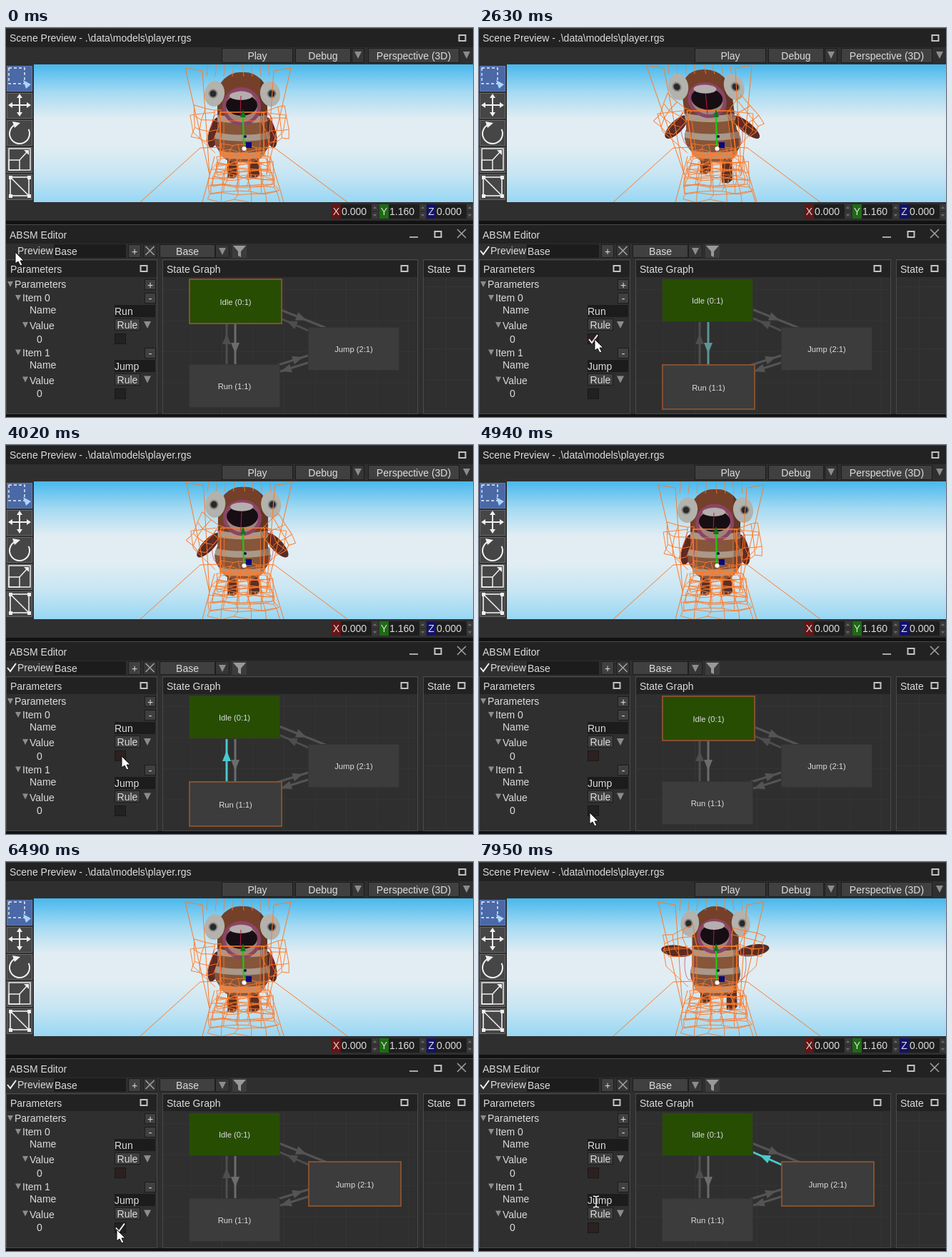
Recreate the animation shown at these times as an HTML page with a canvas. Size 654 px wide and 545 px high, loop 8 s.

```html
<!DOCTYPE html>
<html>
<head>
<meta charset="utf-8">
<style>
html, body { margin: 0; width: 100%; height: 100%; overflow: hidden; background: #141414; }
canvas { display: block; }
</style>
</head>
<body>
<canvas id="stage" width="654" height="545"></canvas>
<script>
const c = document.getElementById('stage').getContext('2d');
const LOOP = 8000, STEP = 77.3, TAU = Math.PI * 2;
const ORANGE = '#ff7a2a', PANEL = '#2f2f2f', HEAD = '#222', GRID = '#353535', GREY = '#8c8c8c', WHITE = '#f0f0f0';
const SIDES = [-1, 1];
const clamp = v => Math.max(0, Math.min(1, v));
const ramp = (t, a, b) => clamp((t - a) / (b - a));
const mix = (a, b, k) => a + (b - a) * k;
let seed;
const rnd = () => (seed = seed * 16807 % 2147483647) / 2147483647;

function box(x, y, w, h, fill, edge) {
  c.fillStyle = fill;
  c.fillRect(x, y, w, h);
  if (edge) frame(x + .5, y + .5, w - 1, h - 1, edge, 1);
}
function frame(x, y, w, h, color, width) {
  c.strokeStyle = color; c.lineWidth = width;
  c.strokeRect(x, y, w, h);
}
function trace(pts) {
  c.beginPath();
  for (let i = 0; i < pts.length; i += 2) c.lineTo(pts[i], pts[i + 1]);
}
function line(color, width, ...pts) {
  trace(pts);
  c.strokeStyle = color; c.lineWidth = width; c.stroke();
}
function poly(color, ...pts) {
  trace(pts);
  c.fillStyle = color; c.fill();
}
function oval(color, x, y, rx, ry = rx, turn = 0) {
  c.beginPath(); c.ellipse(x, y, rx, ry, turn, 0, TAU);
  c.fillStyle = color; c.fill();
}
function at(x, y, angle, flip, paint) {
  c.save();
  c.translate(x, y);
  c.scale(flip, 1);
  c.rotate(angle);
  paint();
  c.restore();
}
function clipTo(x, y, w, h, paint) {
  c.save();
  c.beginPath(); c.rect(x, y, w, h); c.clip();
  paint();
  c.restore();
}
function text(s, x, y, align = 'left', size = 14) {
  c.font = size + 'px "Liberation Sans", Arial, sans-serif';
  c.textAlign = align; c.fillStyle = '#dcdcdc';
  c.fillText(s, x, y + size * .36);
}
function button(s, x, y, w, h) {
  box(x, y, w, h, '#404040', '#1c1c1c');
  text(s, x + w / 2, y + h / 2, 'center');
}
const down = (x, y, r = 5) => poly(GREY, x - r, y - r, x + r, y - r, x, y + r);
const check = (x, y) => line(WHITE, 2, x - 6, y, x - 2, y + 5, x + 6, y - 6);
const square = (x, y) => frame(x - 4.5, y - 4, 9, 8, '#c4c4c4', 2);
function cross(x, y) {
  for (const d of SIDES) line('#a0a0a0', 1.6, x - 6, y - 6 * d, x + 6, y + 6 * d);
}
function gridLines(x, y, right, bottom) {
  for (let u = x; u < right; u += 43.5) line(GRID, 1, u, 350, u, bottom);
  for (let v = y; v < bottom; v += 43.5) line(GRID, 1, x - 40, v, right, v);
}

// Wobbly wire grid: a trapezoid with a top and a bottom edge.
function mesh(x, y, top, bottom, h, cols, rows, wobble) {
  const grid = [];
  for (let r = 0; r <= rows; r++) {
    grid.push([]);
    for (let i = 0; i <= cols; i++) {
      grid[r].push([x + (i / cols - .5) * mix(top, bottom, r / rows) + (rnd() - .5) * wobble,
                    y + h * r / rows + (rnd() - .5) * wobble]);
    }
  }
  grid.forEach((row, r) => {
    line(ORANGE, .9, ...row.flat());
    if (r) row.forEach((p, i) => line(ORANGE, .9, ...p, ...grid[r - 1][i]));
  });
}

function pose(t) {
  const run = ramp(t, 2150, 2450) - ramp(t, 3950, 4350);
  const jump = ramp(t, 5420, 5650);
  const phase = Math.max(0, t - 5450) / 1150 % 1;
  const lift = phase < .55 ? jump * Math.sin(Math.PI * phase / .55) : 0;
  const idle = t < 600 ? 0 : (1 - Math.cos((t - 600) / 2400 * TAU)) / 2;
  const beat = (t - 3160) / 600 * TAU + .66;
  return {
    run, lift, beat,
    sway: -13 * run * Math.sin(beat),
    look: mix(3 * idle * (1 - jump), 6.5, run) + 6 * lift + jump
  };
}

function face(narrow, look) {
  c.save();
  c.translate(331, -look);
  c.scale(narrow, 1);
  oval('#8b4466', -1, 110, 27, 27 - look * .4);
  oval('#a08478', -1, 110, 22, 22 - look * .4);
  oval('#170e14', -1, 108, 22, 15);
  oval('#b5aeae', -2, 95, 16, 6);
  for (const side of SIDES) {
    const x = side * 39;
    oval('#b3b2ac', x, 92, 14, 18, side * -.15);
    oval('#85847f', x + side * 2, 92, 6.5);
    oval('#29292c', x + side * 2, 92, 4.5);
  }
  c.restore();
}

function character(t) {
  const { run, lift, beat, sway, look } = pose(t);
  const spread = .25 + .6 * run + 1.72 * lift;
  const angles = [spread, spread + Math.max(0, lift - .82) * 3.5];
  const stride = 7 * run * Math.sin(beat);

  for (const side of SIDES) {
    at(332 + side * 15 + (side > 0 ? 8 * lift : 0), 178 + side * stride - (side < 0 ? 15 : 4) * lift, 0, 1, () => {
      poly('#5a3024', -7, 0, 7, 0, 8, 28, 2, 33, -7, 32);
      for (const x of [-4, 2]) line('#a08a76', 1.6, x, 28, x, 32);
    });
  }

  // The body leans about the feet.
  c.save();
  c.translate(331, 185);
  c.transform(1, 0, -sway / 95, 1 + run * .03, 0, 0);
  c.translate(-331, -185);
  SIDES.forEach((side, i) => at(331 + side * 34, 127, angles[i], -side, () => oval('#5a2b22', 0, 20, 8, 22)));

  const body = new Path2D();
  body.roundRect(296 + 3 * lift, 62, 70 - 6 * lift, 126, [32, 32, 26, 26]);
  body.ellipse(331, 156, 39 - 5 * lift, 30, 0, 0, TAU);
  c.save();
  c.clip(body);
  box(285, 55, 90, 140, '#74402a');
  box(285, 125, 90, 70, '#86553a');
  for (let i = 0; i < 3; i++) {
    c.beginPath(); c.ellipse(331, 119 + i * 25, 48, 10, 0, 0, Math.PI);
    c.strokeStyle = '#a8998a'; c.lineWidth = 9; c.stroke();
  }
  box(356, 60, 20, 130, 'rgba(50,20,10,.25)');
  c.restore();
  face(1 - .1 * lift, look);

  for (const side of SIDES) {
    const m = x => 325 + side * x;
    line(ORANGE, 1, m(50), 60, m(74), 56, m(40), 205);
    line(ORANGE, 1, m(50), 60, m(40), 205);
    for (let i = 0; i < 4; i++) line(ORANGE, .8, m(8 + i * 12), 68, m(6 + i * 12), 48);
    line(ORANGE, .9, m(32), 118, m(67), 122, m(63), 146, m(32), 175);
    at(329 + side * 32, 126, angles[i = (side + 1) / 2] * .8, -side, () => mesh(-15, -10, 36, 28, 44, 3, 3, 7));
    c.beginPath(); c.ellipse(331 + side * 36, 143, 7, 22, 0, 0, TAU);
    c.strokeStyle = 'rgba(184,25,61,.7)'; c.lineWidth = .8; c.stroke();
  }
  frame(300, 118, 61, 60, ORANGE, 1.6);
  frame(305, 130, 51, 48, ORANGE, .8);
  line('#b8193d', 1, 329, 95, 328, 122);
  c.restore();

  // Wires around the legs, widening towards the viewer.
  for (let i = 0; i < 4; i++) mesh(332 + stride * (i - 1.5) / 3, 165 + i * 8, 56 + i * 8, 78 + i * 8, 42 + i * 4, 5, 5, 7);
  for (const side of SIDES) {
    line(ORANGE, 1, 331 + side * 39, 180, 332 + side * 57, 244);
    line(ORANGE, 1, 333 + side * 145, 244, 324 + side * 52, 168, 331 + side * 30, 167);
  }

  // Move gizmo.
  line('#10d010', 2.2, 332, 124, 333, 165);
  poly('#0b7a1c', 328, 125, 332, 114, 336, 125);
  oval('#10105c', 335, 152, 2);
  box(336, 160, 8, 8, '#0a0a78');
  oval('#fff', 333.5, 169, 3);
}

function viewport(t) {
  const sky = c.createLinearGradient(0, 51, 0, 244);
  ['#48b8ed', '#a4daf2', '#e2edf3', '#e0edf3', '#c6e5f3', '#98d7f4'].forEach((color, i) => sky.addColorStop(i / 5, color));
  clipTo(39, 51, 615, 193, () => {
    box(39, 51, 615, 193, sky);
    character(t);
  });
}

function toolIcons() {
  for (let i = 0; i < 5; i++) box(1, 53 + i * 38, 36, 36, i ? '#464646' : '#4a69a6', i ? '#686868' : '#5d7cba');
  c.setLineDash([4, 3]);
  frame(4, 56, 22, 22, WHITE, 1.4);
  c.setLineDash([]);
  poly('#a9d4ff', 24, 73, 35, 79, 28, 85);
  at(19, 108, 0, 1, () => {
    for (let i = 0; i < 4; i++) {
      line(WHITE, 2, 0, 0, 0, -11);
      poly(WHITE, -4, -10, 0, -16, 4, -10);
      c.rotate(TAU / 4);
    }
  });
  c.beginPath(); c.arc(19, 148, 14, -.45, 4.3);
  c.strokeStyle = WHITE; c.lineWidth = 2; c.stroke();
  poly(WHITE, 9, 131, 20, 133, 12, 140);
  frame(4, 169, 30, 30, WHITE, 1.5);
  frame(4, 185, 15, 14, WHITE, 1.5);
  line(WHITE, 1.5, 19, 185, 30, 173);
  poly(WHITE, 25, 171, 32, 171, 32, 178);
  frame(6, 209, 26, 26, WHITE, 1.6);
  line(WHITE, 1.6, 6, 209, 32, 235);
  for (let i = 0; i < 4; i++) box(4 + i % 2 * 26, 207 + (i >> 1) * 26, 5, 5, WHITE);
}

function scenePanel(t) {
  box(0, 0, 654, 270, PANEL);
  box(0, 0, 654, 27, HEAD);
  box(0, 0, 654, 1, '#3c3c3c');
  text('Scene Preview - .\\data\\models\\player.rgs', 5, 14);
  square(639, 14);
  button('Play', 302, 28, 100, 21);
  button('Debug', 405, 28, 78, 21);
  box(484, 28, 18, 21, '#363636', '#1c1c1c');
  down(493, 38);
  button('Perspective (3D)', 507, 28, 128, 21);
  down(645, 38);
  viewport(t);
  toolIcons();
  [['X', '#681414', '0.000'], ['Y', '#1d6b14', '1.160'], ['Z', '#12126a', '0.000']].forEach(([axis, color, value], i) => {
    const x = 456 + Math.round(i * 66.5);
    box(x, 247, 13, 20, color);
    text(axis, x + 6.5, 257, 'center');
    box(x + 13, 247, 43, 20, '#1e1e1e');
    text(value, x + 14, 257);
    for (const d of SIDES) {
      box(x + 56, d < 0 ? 247 : 258, 9, 9, '#383838');
      poly('#6d6d6d', x + 58, 257 + d * 4, x + 63, 257 + d * 4, x + 60.5, 257 + d * 7);
    }
  });
}

function parameters(t) {
  const runOn = t >= 2000 && t < 3930, jumpOn = t >= 5300 && t < 7480;
  down(6, 359, 4); text('Parameters', 12, 359);
  button('+', 194, 352, 16, 15);
  [['Run', runOn, t > 1400], ['Jump', jumpOn, t > 7480]].forEach(([name, on, touched], i) => {
    const y = i * 76.5, snap = v => Math.round(v + y);
    down(17, 378 + y, 4); text('Item ' + i, 23, 378 + y);
    button('-', 194, snap(371), 16, 15);
    text('Name', 33, 395 + y);
    box(152, snap(388), 57, 17, '#1c1c1c');
    text(name, 152, 397 + y);
    down(27, 416 + y, 4); text('Value', 33, 417 + y);
    button('Rule', 152, snap(407), 36, 17);
    down(198, 416 + y);
    text('0', 43, 435.5 + y);
    box(152, snap(428), 16, 15, touched ? '#2c2021' : '#212121', '#191919');
    if (on) check(160, 436 + y);
  });
}

// Draws a link with its head part of the way along it.
function link(base, glow, x0, y0, x1, y1, k) {
  const color = `rgb(${[76, 200, 204].map(v => Math.round(mix(base, v, glow)))})`;
  line(color, 3, x0, y0, x1, y1);
  at(mix(x0, x1, k), mix(y0, y1, k), Math.atan2(y1 - y0, x1 - x0), 1, () => poly(color, -7, -6, 8, 0, -7, 6));
}

function node(s, x, y, fill, active) {
  const w = active ? 131 : 128, h = active ? 64 : 61, edge = active ? 2 : 1;
  box(x, y, w, h, active ? '#84502f' : '#333');
  box(x + edge, y + edge, w - edge * 2, h - edge * 2, fill);
  text(s, x + w / 2, y + h / 2 + .5, 'center', 11.2);
}

function graph(t) {
  const glow = start => t >= start ? 1 - ramp(t, start + 100, start + 760) : 0;
  const state = t < 2440 ? 0 : t < 4260 ? 1 : t < 5600 ? 0 : 2;
  clipTo(220, 350, 356, 190, () => {
    gridLines(259, 366.5, 577, 540);
    link(84, 0, 375, 474, 426, 458, .66);
    link(84, 0, 426, 468, 378, 483, .7);
    link(108, glow(2140), 321, 400, 321, 475, .64);
    link(78, glow(3940), 309, 475, 309, 400, .52);
    link(84, glow(5400), 380, 393, 450, 421, .48);
    link(78, glow(7870), 428, 426, 380, 405, .58);
    node('Idle (0:1)', 256, 351, '#274d03', state === 0);
    node('Run (1:1)', 256, 471, '#3c3c3c', state === 1);
    node('Jump (2:1)', 423, 419, '#3c3c3c', state === 2);
  });
}

function panel(title, x, w, icon) {
  box(x, 324, w, 217, PANEL, '#4a4a4a');
  box(x + 1, 326, w - 2, 23, HEAD);
  text(title, x + 6, 338);
  square(icon, 337);
}

function editor(t) {
  box(0, 275, 654, 1, '#4a4a4a');
  box(0, 276, 654, 265, PANEL);
  box(0, 276, 654, 26, HEAD);
  text('ABSM Editor', 5, 290);
  line('#a8a8a8', 2, 565, 293, 577, 293);
  square(605, 289);
  cross(638, 288);
  text('Preview', 16, 312);
  if (t >= 600) check(8, 312);
  box(67, 303, 101, 19, '#1c1c1c');
  text('Base', 68, 313);
  button('+', 171, 303, 18, 19);
  box(192, 303, 19, 19, '#363636', '#1f1f1f');
  cross(201.5, 312);
  button('Base', 215, 303, 78, 19);
  box(293, 303, 20, 19, '#363636', '#1f1f1f');
  down(303, 313);
  box(317, 303, 20, 19, '#3c3c3c');
  poly('#999', 318, 305, 336, 305, 329, 313, 329, 321, 325, 319, 325, 313);
  panel('Parameters', 0, 212, 193);
  panel('State Graph', 219, 358, 558);
  panel('State', 584, 72, 638);
  clipTo(585, 350, 69, 190, () => gridLines(616.5, 362.5, 654, 540));
  parameters(t);
  graph(t);
}

// Pointer stops: time, x, y.
const stops = [
  [0, 13, 314], [63, 11, 314], [600, 11, 314], [1380, 162, 436], [4100, 162, 436], [4500, 158, 526],
  [4720, 155, 515], [6800, 155, 515], [7130, 166, 500], [7420, 157, 511], [7880, 164, 476], [LOOP, 164, 476]
];
function pointer(t) {
  const i = stops.findIndex(s => s[0] > t);
  const [t0, x0, y0] = stops[i - 1], [t1, x1, y1] = stops[i];
  const k = ramp(t, t0, t1), e = k * k * (3 - 2 * k);
  at(mix(x0, x1, e), mix(y0, y1, e), 0, 1, () => {
    if (t > 7700) {
      line(WHITE, 1.4, 0, -7, 0, 7);
      for (const d of SIDES) line(WHITE, 1.4, -4, d * 8, 0, d * 7, 4, d * 8);
    } else {
      const shape = [0, 0, 0, 16, 4, 13, 7, 19, 10, 18, 7, 12, 12, 12, 0, 0];
      poly('#fff', ...shape);
      line('#111', 1, ...shape);
    }
  });
}

function draw() {
  const now = (performance.now() - start) % LOOP;
  const t = Math.max(0, Math.floor((now + 18) / STEP) * STEP - 13);
  seed = 71;
  box(0, 0, 654, 545, '#121212');
  scenePanel(t);
  editor(t);
  pointer(t);
  requestAnimationFrame(draw);
}
let i = 0;
const start = performance.now();
draw();
</script>
</body>
</html>
```
